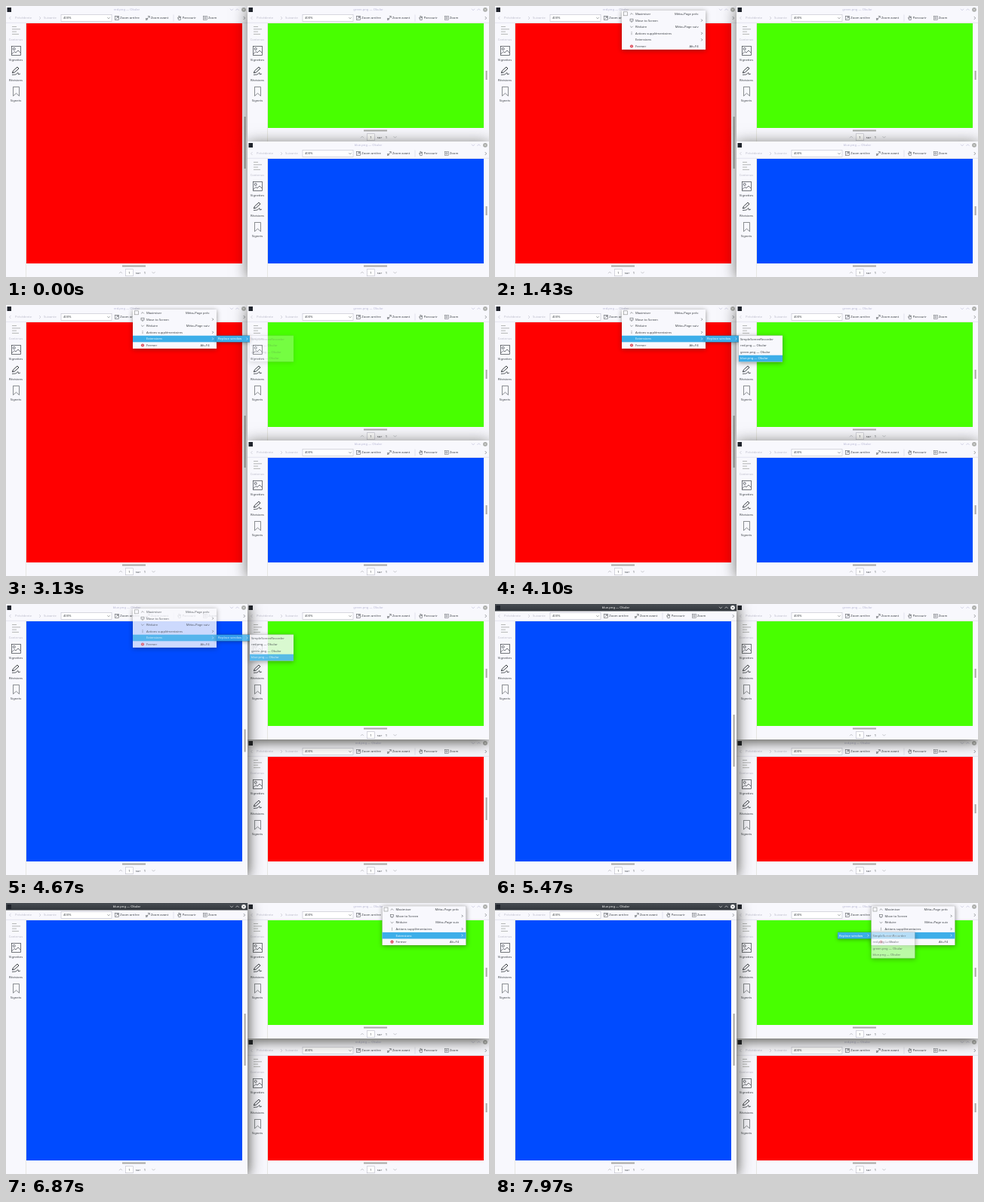
Recreate the animation shown at these times as an HTML page with a canvas. Size 640 by 360 pixels, loop 8 s.

```html
<!DOCTYPE html>
<html lang="fr">
<head>
<meta charset="utf-8">
<title>Replace window</title>
<style>
html, body { margin: 0; width: 100%; height: 100%; overflow: hidden; background: #f8f8fd; }
canvas { display: block; width: 640px; height: 360px; }
</style>
</head>
<body>
<canvas id="stage"></canvas>
<script>
const LOOP = 8000;
const RED = '#ff0000', GREEN = '#48ff00', BLUE = '#004bff';
const PANEL = '#f8f8fd', INK = '#3c4045', ICON = '#5c6064', PALE = '#bcbcca', LINE = '#d6d6e2', HOVER = '#3daee9';
const ROW = 8.6;

// Each track is a list of [time, value] holding until the next entry.
const SWAP = 4500, FOCUS = 4850;
const firstHover = [[0, -1], [1450, 0], [1580, 1], [1720, 2], [1850, 3], [2000, 4]];
const listHover = [[0, -1], [3400, 0], [3600, 1], [3780, 2], [3950, 3]];
const secondHover = [[0, -1], [6350, 0], [6450, 1], [6550, 2], [6650, 3], [6750, 4]];
const at = (track, t) => track.reduce((v, [time, next]) => t >= time ? next : v, -1);
const ramp = (t, from, length) => Math.max(0, Math.min(1, (t - from) / length));

const canvas = document.getElementById('stage');
const ctx = canvas.getContext('2d');
const dpr = window.devicePixelRatio || 1;
canvas.width = 640 * dpr;
canvas.height = 360 * dpr;

function box(x, y, w, h, fill) {
  ctx.fillStyle = fill;
  ctx.fillRect(x, y, w, h);
}

function frame(x, y, w, h, color = ICON, width = .6) {
  ctx.strokeStyle = color;
  ctx.lineWidth = width;
  ctx.strokeRect(x, y, w, h);
}

function path(points, color = ICON, width = .6) {
  ctx.strokeStyle = color;
  ctx.lineWidth = width;
  ctx.beginPath();
  points.forEach(([x, y]) => ctx.lineTo(x, y));
  ctx.stroke();
}

function disc(x, y, r, fill) {
  ctx.fillStyle = fill;
  ctx.beginPath();
  ctx.arc(x, y, r, 0, Math.PI * 2);
  ctx.fill();
}

function label(text, x, y, color = INK, align = 'left', size = 4.15) {
  ctx.font = `${size}px "Noto Sans", sans-serif`;
  ctx.textAlign = align;
  ctx.textBaseline = 'alphabetic';
  ctx.fillStyle = color;
  ctx.fillText(text, x, y + size * .36);
}

function chevron(x, y, dir, color = ICON, s = 2) {
  const side = { up: [0, -1], down: [0, 1], left: [-1, 0], right: [1, 0] }[dir];
  const [dx, dy] = side.map(v => v * s / 2);
  path([[x - dx - dy * 2, y - dy - dx * 2], [x + dx, y + dy], [x - dx + dy * 2, y - dy + dx * 2]], color);
}

// The shadow stays outside the box, so it never shows through a fading menu.
function shadowed(x, y, w, h, fill, blur, alpha, dy = 1) {
  ctx.save();
  ctx.beginPath();
  ctx.rect(-700, -400, 1400, 800);
  ctx.rect(x, y, w, h);
  ctx.clip('evenodd');
  ctx.shadowColor = `rgba(25, 25, 15, ${alpha})`;
  ctx.shadowBlur = blur * dpr;
  ctx.shadowOffsetY = dy * dpr;
  box(x, y, w, h, '#000');
  ctx.restore();
  box(x, y, w, h, fill);
}

function titleBar(name, active) {
  if (active) {
    const shade = ctx.createLinearGradient(0, 0, 0, 10);
    shade.addColorStop(0, '#474c52');
    shade.addColorStop(1, '#31363b');
    box(0, 0, 320, 9.5, shade);
  }
  const ink = active ? '#fcfcfc' : '#b6b6d2';
  box(1.5, 2, 5.5, 6, '#20242c');
  label(`${name}.png — Okular`, 160, 4.8, ink, 'center');
  chevron(299, 4.8, 'down', ink);
  chevron(306.5, 4.8, 'up', ink);
  disc(315, 4.8, 2.9, active ? '#fcfcfc' : '#a9aba8');
  const cross = active ? '#31363b' : '#f4f4f4';
  path([[313.9, 3.7], [316.1, 5.9]], cross);
  path([[316.1, 3.7], [313.9, 5.9]], cross);
}

function zoomIcon(x) {
  frame(x, 13.3, 5, 5);
  path([[x + 1.2, 17.2], [x + 3.8, 14.5]]);
  path([[x + 2, 14.4], [x + 3.9, 14.4], [x + 3.9, 16.2]]);
}

function toolBar() {
  chevron(5.5, 16, 'left', PALE);
  label('Précédente', 12, 16, PALE);
  chevron(45, 16, 'right', PALE);
  label('Suivante', 50, 16, PALE);
  box(73, 11.5, 67, 9, '#ffffff');
  frame(73, 11.5, 67, 9, '#c0c0cc');
  label('400%', 76, 16);
  chevron(136, 16, 'down', ICON, 1.6);
  zoomIcon(144.5);
  label('Zoom arrière', 151.3, 16);
  path([[185.5, 18.5], [187, 17], [190, 13.8]]);
  path([[187.8, 13.5], [190.3, 13.5], [190.3, 16]]);
  frame(185.4, 16.4, 2.2, 2.2, ICON, .5);
  label('Zoom avant', 192, 16);
  path([[222, 11.5], [222, 20.5]], LINE);
  path([[227.5, 15.5], [228.7, 18.6], [231.2, 18.6], [231.7, 14.2], [230.6, 14.2],
    [230.2, 16], [229.8, 13.3], [228.8, 13.3], [228.9, 16.5], [227.5, 15.5]]);
  label('Parcourir', 233.7, 16);
  frame(261.5, 13.5, 4.8, 4.8, ICON, .5);
  frame(262.9, 14.9, 2, 2, ICON, .5);
  label('Zoom', 268, 16);
  chevron(315.7, 16, 'right');
  path([[0, 22.3], [320, 22.3]], LINE);
}

function sideBar() {
  [[8, 6], [8, 11], [8, 6], [8, 9]].forEach(([x, w], i) =>
    path([[x, 27.5 + i * 3.3], [x + w, 27.5 + i * 3.3]], '#a4a6a4', .8));
  label('Contenus', 13, 45, PALE, 'center');

  frame(7.5, 53.5, 12, 12, INK, .7);
  ctx.beginPath();
  ctx.arc(10.7, 57, 1.5, 0, Math.PI * 2);
  ctx.stroke();
  path([[7.5, 64], [11, 60.5], [13, 62], [16, 59], [19, 62]], INK, .7);
  label('Vignettes', 13, 72, INK, 'center');

  path([[8.3, 89], [9.5, 86], [15, 81], [17, 83], [11.5, 88], [8.3, 89]], INK, 1);
  path([[8, 91.5], [13, 91], [16, 88.5], [16.5, 91], [19, 90]], INK, .8);
  label('Révisions', 13, 99, INK, 'center');

  path([[9.5, 107.5], [17.5, 107.5], [17.5, 119.5], [13.5, 116], [9.5, 119.5], [9.5, 107.2]], ICON, .7);
  label('Signets', 13, 126, INK, 'center');
  path([[26.5, 22.5], [26.5, 360]], '#dcdcd0');
}

function windowAt(x, y, height, name, color, { active = false, shadow = 0, settling = false }) {
  ctx.save();
  ctx.translate(x, y);
  shadowed(0, 0, 320, height, PANEL, 18, shadow, 2);
  ctx.beginPath();
  ctx.rect(0, 0, 320, height);
  ctx.clip();
  titleBar(name, active);
  toolBar();
  sideBar();
  const tall = height === 360, bottom = height - 18;
  box(27, 23, 286, bottom - 23, color);
  const middle = tall ? 181.5 : 92;
  const handle = settling ? 30 : tall ? 69 : 12;
  box(315.6, middle - handle / 2, 2, handle, '#aaa9a6');
  box(154, bottom + 2.5, 31, 2, '#aaa9a6');

  const foot = height - 5.8;
  chevron(152, foot, 'up', '#a3a5aa');
  box(158.5, foot - 4.5, 10, 9, '#ffffff');
  frame(158.5, foot - 4.5, 10, 9, '#bcbcc8');
  label('1', 163.5, foot, INK, 'center');
  label('sur', 175, foot, INK, 'center');
  label('1', 184, foot, INK, 'center');
  chevron(195.5, foot, 'down', '#a3a5aa');
  ctx.restore();
}

function menuIcon(row, y) {
  if (row === 0) {
    frame(2.5, 1.7, 5, 5, '#8a8c88');
    chevron(13, y, 'up', ICON, 1.8);
  } else if (row === 1) {
    frame(11, y - 1.9, 4, 2.8);
    path([[12, y + 2], [14, y + 2]]);
  } else if (row === 2) {
    chevron(13, y, 'down', ICON, 1.8);
  } else if (row === 3) {
    [-1.5, 0, 1.5].forEach(d => disc(13, y + d, .45, INK));
  } else if (row === 5) {
    disc(13, y, 2.1, '#da4453');
    path([[12.2, y - .8], [13.8, y + .8]], '#fff', .5);
    path([[13.8, y - .8], [12.2, y + .8]], '#fff', .5);
  }
}

const ITEMS = [
  ['Maximiser', 'Méta+Page préc'], ['Move to Screen', '>'], ['Réduire', 'Méta+Page suiv'],
  ['Actions supplémentaires', '>'], ['Extensions', '>'], ['Fermer', 'Alt+F4']
];

function mainMenu(x, y, hover, alpha) {
  ctx.save();
  ctx.globalAlpha = alpha;
  ctx.translate(x, y);
  shadowed(0, 0, 111, 51.8, PANEL, 6, .45);
  ITEMS.forEach(([text, extra], i) => {
    const mid = 4.4 + i * ROW, ink = i === hover ? '#f4fbff' : INK;
    if (i === hover) box(0, mid - 4.2, 111, ROW, HOVER);
    menuIcon(i, mid);
    label(text, 18, mid, ink);
    if (extra === '>') chevron(106, mid, 'right', ink, 1.5);
    else label(extra, 101.5, mid, ink, 'right');
  });
  ctx.restore();
}

function replaceMenu(x, y, hover, alpha) {
  ctx.save();
  ctx.globalAlpha = alpha;
  shadowed(x, y, 44, ROW, hover ? HOVER : PANEL, 5, .4);
  const ink = hover ? '#f4fbff' : INK;
  label('Replace window', x + 2, y + 4.3, ink);
  chevron(x + 40.5, y + 4.3, 'right', ink, 1.5);
  ctx.restore();
}

function windowList(x, y, hover, alpha) {
  const entries = ['SimpleScreenRecorder', ...['red', 'green', 'blue'].map(n => `${n}.png — Okular`)];
  ctx.save();
  ctx.globalAlpha = alpha;
  shadowed(x, y, 58, 35, PANEL, 6, .45);
  entries.forEach((text, i) => {
    const mid = y + 4.6 + i * ROW;
    if (i === hover) box(x, mid - 4.2, 58, ROW, HOVER);
    label(text, x + 2, mid, i === hover ? '#f4fbff' : INK);
  });
  ctx.restore();
}

function windows(t) {
  if (t < SWAP) {
    windowAt(0, 0, 360, 'red', RED, {});
    windowAt(320, 0, 180, 'green', GREEN, { shadow: .6 });
    windowAt(320, 180, 180, 'blue', BLUE, { shadow: .6 });
  } else {
    const active = t >= FOCUS, settling = !active;
    windowAt(320, 180, 180, 'red', RED, { settling });
    windowAt(320, 0, 180, 'green', GREEN, { shadow: .85 });
    windowAt(0, 0, 360, 'blue', BLUE, { active, settling, shadow: .85 });
  }
}

function draw(t) {
  ctx.setTransform(dpr, 0, 0, dpr, 0, 0);
  windows(t);

  const closing = 1 - ramp(t, 4630, 230);
  const first = ramp(t, 1250, 120) * closing;
  const replace = ramp(t, 2650, 120) * closing;
  const list = ramp(t, 3100, 120) * closing;
  if (first) mainMenu(168, 6.1, at(firstHover, t), first);
  if (replace) replaceMenu(279, 40.7, t >= 2950, replace);
  if (list) windowList(323, 40.5, at(listHover, t), list);

  const second = ramp(t, 6150, 120);
  const replaceAgain = ramp(t, 7450, 120);
  const listAgain = ramp(t, 7880, 140);
  if (second) mainMenu(498.5, 4.3, at(secondHover, t), second);
  if (replaceAgain) replaceMenu(454, 38.9, t >= 7700, replaceAgain);
  if (listAgain) windowList(498.5, 38.5, -1, listAgain);
}

const start = performance.now();
function tick() {
  draw((performance.now() - start) % LOOP);
  requestAnimationFrame(tick);
}
tick();
</script>
</body>
</html>
```
